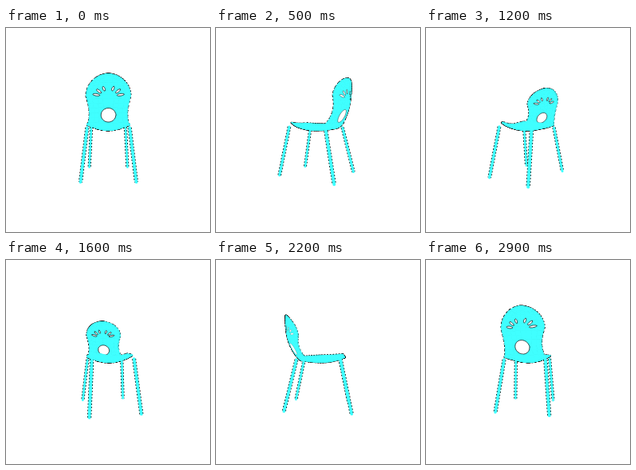
Recreate the animation shown at these times as an HTML page with a canvas. Size 256 by 256 pixels, loop 3 s.

```html
<!DOCTYPE html>
<html>
<head>
<meta charset="utf-8">
<style>
  html, body { margin: 0; height: 100%; overflow: hidden; background: #fff; }
  canvas { display: block; }
</style>
</head>
<body>
<canvas id="stage" width="256" height="256"></canvas>
<script>
const ctx = document.getElementById('stage').getContext('2d');
const { PI, sin, cos, sqrt, abs, floor } = Math;
const CYAN = '#40ffff', BLACK = '#000', WHITE = '#fff';
const DEPTH = 226, LOOP = 3000, STEP = 100, ROWS = 18, COLUMNS = 8;
const TOP = -54.5, BACK_HEIGHT = 56.5, SHOULDER = -33;

let turnSin, turnCos;

// Chair space: u to the right, w towards the back, y down from eye level
function project([u, w, y]) {
  const scale = DEPTH / (DEPTH - w * turnCos + u * turnSin);
  return [128.5 + (u * turnCos + w * turnSin) * scale, 124 + y * scale, scale];
}

// Each section runs across the shell; its sides bend forward and up
function backSection(y) {
  const v = (y - TOP) / BACK_HEIGHT;
  const width = y < SHOULDER
    ? 24 * sqrt(1 - ((y - SHOULDER) / (TOP - SHOULDER)) ** 2)
    : 24 - 3.5 * sin(PI * (y - SHOULDER) / (TOP + BACK_HEIGHT - SHOULDER));
  return {
    width, y,
    w: 40.5 - 19.5 * v ** 3,
    forward: 0.014 * (1 - v ** 4),
    up: 4 * v ** 12
  };
}

function seatSection(t) {
  const arch = sin(PI * t);
  return {
    width: (24 + 3 * arch) * sqrt(1 - t ** 8),
    y: 2 + 2.5 * arch - 4 * t ** 4,
    w: 21 - 54 * t,
    forward: 0,
    up: 4 + 4 * arch
  };
}

function pointOn({ width, w, y, forward, up }, u) {
  const s = width ? u / width : 0;
  return [u, w - forward * u * u, y - up * s * s];
}

const sections = make =>
  Array.from({ length: ROWS + 1 }, (_, i) => make(i / ROWS));
const back = sections(t => backSection(TOP + BACK_HEIGHT * t * t));
const seat = sections(seatSection);

// Top and foot of the right-hand legs
const legs = [
  [[24, 22.5, 1], [29.5, 35.5, 58.5]],
  [[24, -27, 0], [28, -39, 59.5]]
];

// A round opening below a fan of leaves
const holes = [{ x: 0, y: -12.5, rx: 8, ry: 7.3, tilt: 0 }];
for (const side of [-1, 1]) {
  for (let i = 0; i < 3; i++) {
    const a = 0.2 + 0.5 * i;
    holes.push({
      x: side * 13 * cos(a), y: -32 - 8 * sin(a),
      rx: 3.8 - 0.7 * i, ry: 1.1, tilt: -side * a
    });
  }
}

function trace(points) {
  ctx.beginPath();
  for (const p of points) {
    const [x, y] = project(p);
    ctx.lineTo(x, y);
  }
  ctx.closePath();
}

function paint(fill, stroke, lineWidth) {
  ctx.fillStyle = fill;
  ctx.strokeStyle = stroke;
  ctx.lineWidth = lineWidth;
  ctx.fill();
  ctx.stroke();
}

function drawShell(rows, color, border) {
  for (let i = 0; i < ROWS; i++) {
    const a = rows[i], b = rows[i + 1];
    for (let j = 0; j < COLUMNS; j++) {
      const s = j * 2 / COLUMNS - 1, next = s + 2 / COLUMNS;
      trace([
        pointOn(a, a.width * s), pointOn(a, a.width * next),
        pointOn(b, b.width * next), pointOn(b, b.width * s)
      ]);
      paint(color, color, border);
    }
  }
}

function drawLegs(color, border) {
  ctx.strokeStyle = color;
  for (const leg of legs) {
    for (const side of [-1, 1]) {
      const [top, foot] = leg.map(([u, w, y]) => project([u * side, w, y]));
      ctx.lineWidth = 3.1 * foot[2] + border;
      ctx.beginPath();
      ctx.moveTo(top[0], top[1]);
      ctx.lineTo(foot[0], foot[1]);
      ctx.stroke();
    }
  }
}

function drawHoles() {
  for (const { x, y, rx, ry, tilt } of holes) {
    const points = [];
    for (let a = 0; a < 2 * PI; a += 0.3) {
      const dx = rx * cos(a), dy = ry * sin(a);
      const u = x + dx * cos(tilt) - dy * sin(tilt);
      points.push(pointOn(backSection(y + dx * sin(tilt) + dy * cos(tilt)), u));
    }
    trace(points);
    paint(WHITE, BLACK, 0.1 + 0.6 * abs(turnCos));
  }
}

function draw(time) {
  const angle = floor(time % LOOP / STEP) * STEP / LOOP * 2 * PI;
  turnSin = sin(angle);
  turnCos = cos(angle);

  ctx.fillStyle = WHITE;
  ctx.fillRect(0, 0, 256, 256);
  ctx.lineJoin = 'round';

  // Broken black outline, then the flat colour over it
  ctx.lineCap = 'butt';
  ctx.setLineDash([2, 2]);
  drawShell(back, BLACK, 2.4);
  drawShell(seat, BLACK, 2.4);
  drawLegs(BLACK, 1.4);

  ctx.lineCap = 'round';
  ctx.setLineDash([]);
  drawShell(back, CYAN, 1);
  drawHoles();
  drawShell(seat, CYAN, 1);
  drawLegs(CYAN, 0);
}

function tick() {
  draw(performance.now());
  requestAnimationFrame(tick);
}
tick();
</script>
</body>
</html>
```
